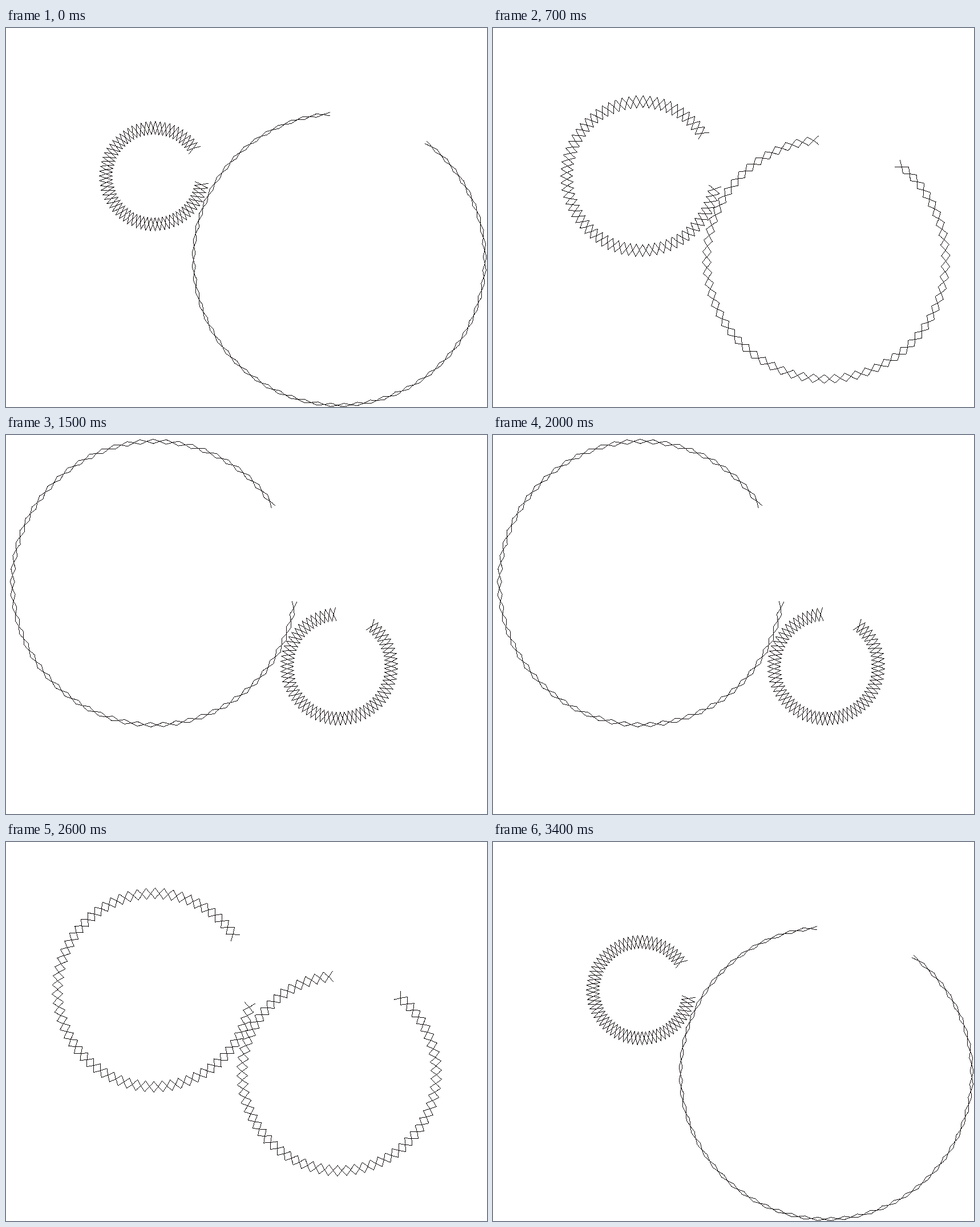
An HTML page with a canvas that plays this animation: 843 px wide and 664 px high, repeating every 3.5 s.

```html
<!DOCTYPE html>
<html>
<head>
<meta charset="utf-8">
<style>
html, body { margin: 0; width: 100%; height: 100%; overflow: hidden; background: #fff; }
canvas { display: block; }
</style>
</head>
<body>
<canvas id="stage" width="843" height="664"></canvas>
<script>
const ctx = document.getElementById('stage').getContext('2d');
const STEP = 100, COUNT = 35;     // ms per pose, poses per loop
const SPAN = 319.7, RAD = Math.PI / 180;
const ARM = 12.05;                // half bar length
const MID = 170;                  // pivot radius when both rings are equal

// Radius offset of the left ring from fully closed to fully open
const OFFSETS = [-85.5, -82, -76, -67.5, -62.8, -51.5, -39.6, -22,
                 -0.5, 22.4, 38.5, 51, 62.7, 70, 78.5, 85.5];

// Hard-edged one pixel line
function line(a, b) {
  const dx = b[0] - a[0], dy = b[1] - a[1];
  const n = Math.max(1, Math.ceil(Math.max(Math.abs(dx), Math.abs(dy))));
  for (let i = 0; i <= n; i++) {
    ctx.fillRect(Math.round(a[0] + dx * i / n), Math.round(a[1] + dy * i / n), 1, 1);
  }
}

// Ring of scissor bars whose pivots lie at the given radius;
// a wider ring needs slightly fewer units to fill the same span
function ring(cx, cy, start, radius) {
  const at = (r, a) => [cx + r * Math.cos(a), cy - r * Math.sin(a)];
  const units = Math.round(64.4 - radius / 75);
  const unit = SPAN / units * RAD;
  const half = radius * Math.sin(unit / 2);
  const rise = Math.sqrt(ARM * ARM - half * half);
  const mean = radius * Math.cos(unit / 2);
  for (let i = 0; i < units; i++) {
    const a = start * RAD + i * unit;
    const pivot = at(radius, a + unit / 2);
    for (const side of [a, a + unit]) {
      line(at(mean + rise, side), pivot);
      line(at(mean - rise, side), pivot);
    }
  }
}

function draw(pose) {
  const u = Math.min(pose, COUNT - pose);
  const offset = OFFSETS[Math.min(16, Math.max(1, u)) - 1];
  ctx.fillStyle = '#fff';
  ctx.fillRect(0, 0, 843, 664);
  ctx.fillStyle = '#140e0e';
  ring(259, 259, 32.7, MID + offset);
  ring(583.5, 405, 93.7, MID - offset);
}

let last = -1;
function tick() {
  const pose = Math.floor(performance.now() / STEP) % COUNT;
  if (pose !== last) draw(last = pose);
  requestAnimationFrame(tick);
}
tick();
</script>
</body>
</html>
```
